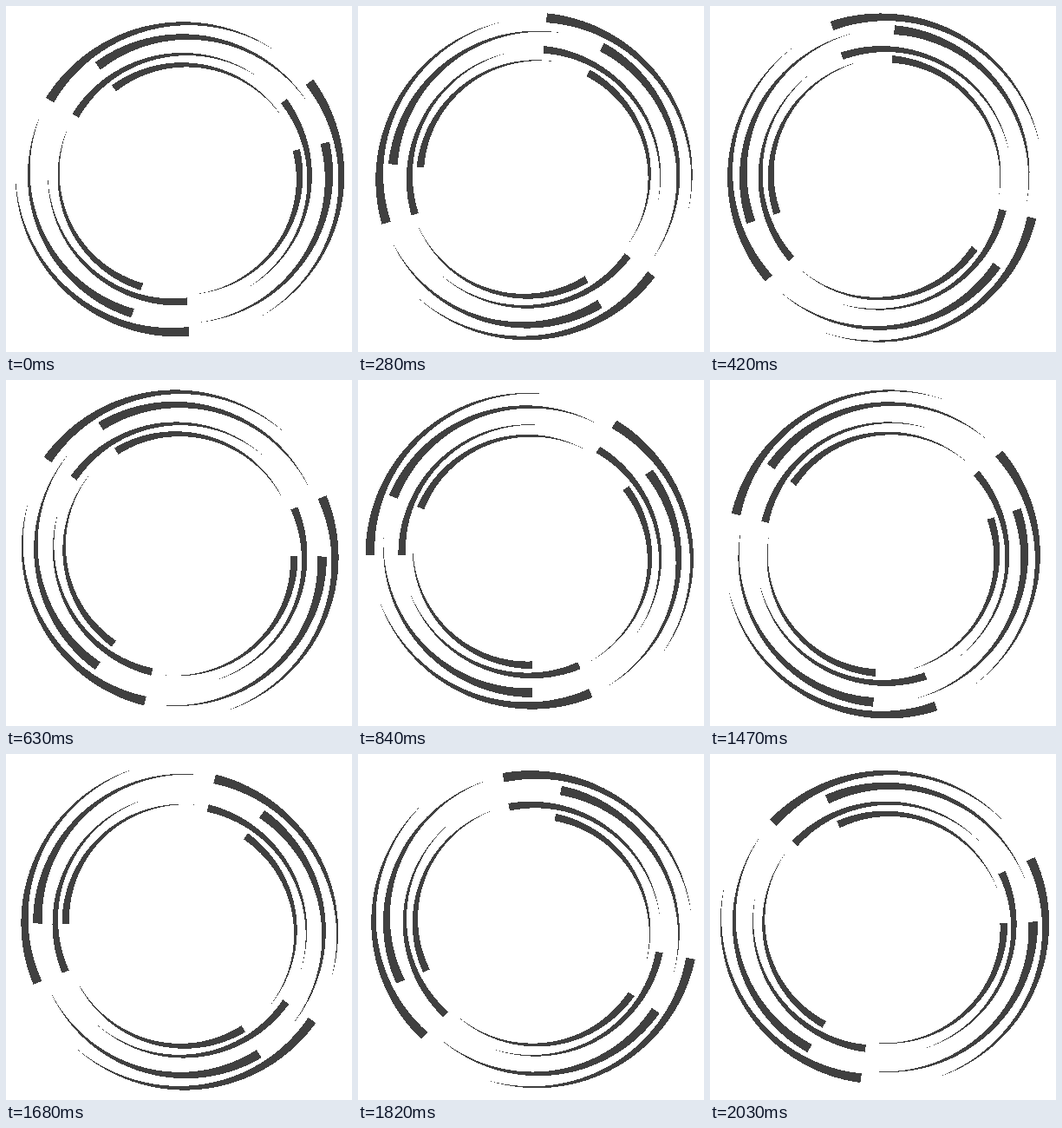
An HTML page for the animation above (2100 ms loop, 399 by 399 pixels).

```html
<!DOCTYPE html>
<html>
<head>
<meta charset="utf-8">
<style>
html, body { margin: 0; width: 100%; height: 100%; overflow: hidden; background: #fff; }
svg { display: block; }
</style>
</head>
<body>
<svg width="399" height="399" viewBox="0 0 399 399">
  <path id="rings" fill="#404040" shape-rendering="crispEdges"/>
</svg>
<script>
const rings = document.getElementById('rings');
const CENTER = '200.5 199.5', STEP = 70, COUNT = 30;
const RAD = Math.PI / 180, SWEEP = 96 * RAD, WIDTH = 10.8;
const INNER_SCALE = 0.803;

// Each band has three blades; drift is how far a blade's outer edge
// lies from the band's circle at its blunt end and at its tip.
const spread = [0, 112, 235.4];
const bands = [
  { radius: 186.5, turn: 211.2, drift: [[-5.8, -2.1], [5.4, -2.5], [-4.9, 3.4]] },
  { radius: 171.8, turn: 234, drift: [[-5.4, 0.1], [5.9, -4.9], [-2.4, 5]] }
];

// The outer edge is a circle with a shifted centre; the width tapers evenly to the tip.
function blade(radius, start, [from, to], scale) {
  const N = 60, outer = [], inner = [];
  for (let i = 0; i <= N; i++) {
    const t = i / N, angle = start * RAD + SWEEP * t;
    const shift = (from * Math.sin(SWEEP * (1 - t)) + to * Math.sin(SWEEP * t)) / Math.sin(SWEEP);
    const r = radius + shift;
    const point = r => [r * scale * Math.cos(angle), r * scale * Math.sin(angle)].map(v => v.toFixed(2));
    outer.push(point(r));
    inner.unshift(point(r - WIDTH * (1 - t)));
  }
  return 'M' + outer.concat(inner).join(' ') + 'Z';
}

const outline = [1, INNER_SCALE].flatMap(scale =>
  bands.flatMap(({ radius, turn, drift }) =>
    drift.map((d, i) => blade(radius, turn + spread[i], d, scale))));
rings.setAttribute('d', outline.join(''));

function draw(now) {
  const step = Math.floor(now / STEP) % COUNT;
  rings.setAttribute('transform', `translate(${CENTER}) rotate(${-step * 360 / COUNT})`);
  requestAnimationFrame(draw);
}

draw(0);
</script>
</body>
</html>
```
